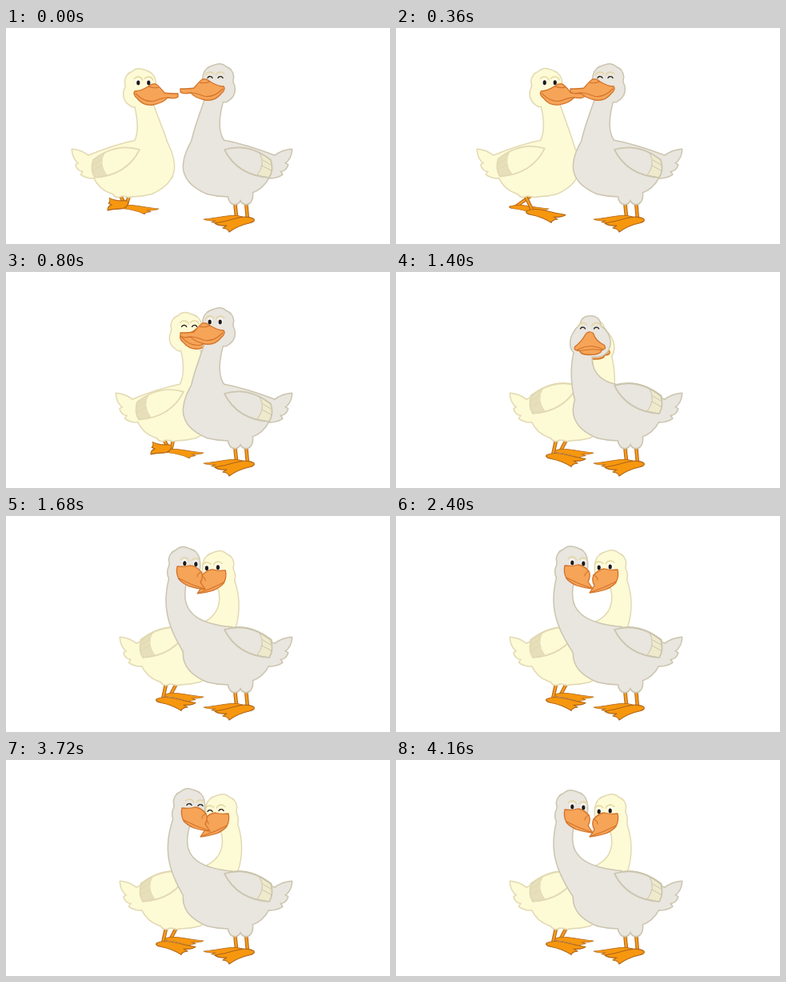
An HTML page with a canvas for the animation above (4.2 s loop, 480 by 270 pixels).

```html
<!DOCTYPE html>
<html lang="en">
<head>
<meta charset="utf-8">
<title>Two geese</title>
<style>
html, body { margin: 0; width: 100%; height: 100%; overflow: hidden; background: #fff; }
canvas { display: block; width: 480px; height: 270px; }
</style>
</head>
<body>
<canvas id="stage"></canvas>
<script>
const LOOP = 4200, STEP = 40;
const canvas = document.getElementById('stage');
const ctx = canvas.getContext('2d');
const dpr = window.devicePixelRatio || 1;
canvas.width = 480 * dpr;
canvas.height = 270 * dpr;

// Geese are described facing left. The neck is a cubic curve from head to chest;
// each of its points moves from a walking place to a turned-back place.
const GREY = {
  fill: '#e9e5df', line: '#cbc5ae', patch: '#eeeacb', girth: 1, rise: 0,
  neck: [[[267, 67], [218, 60]], [[258, 100], [196, 115]], [[240, 140], [215, 140]], [[262, 170], [262, 170]]],
  nuzzle: [9, -2]
};
const CREAM = {
  fill: '#fdfad6', line: '#e2d9b2', patch: '#e6dfba', girth: 0.94, rise: 9,
  neck: [[[274, 73], [230, 65]], [[268, 100], [205, 112]], [[250, 140], [222, 142]], [[265, 170], [262, 170]]],
  nuzzle: [-1, 0]
};

const BODY = new Path2D('M268 140Q300 146 336 160Q345 153 357 152Q356 164 348 169L352 171Q350 178 342 179L345 183Q337 188 328 187Q321 201 306 206Q280 214 252 207Q222 195 222 172Q223 155 236 136Z');
const WING = new Path2D('M273 152Q303 143 331 165Q335 177 329 187Q289 184 273 152Z');
const PATCH = new Path2D('M317 156Q325 170 314 184L329 187Q335 177 331 165Z');
const PATCH_LINES = new Path2D('M321 165L331 171M320 172L331 178');
const FOOT = new Path2D('M-41 5Q-28 3-15-1Q0-5 8 0Q10 3 2 5Q-12 8-23 16Q-24 12-31 11L-26 8Q-36 9-41 5Z');
const HEAD_SIDE = new Path2D('M-20-8Q-18-17-7-20Q2-24 8-18Q16-15 17-6Q15 0 18 5Q21 18 8 25L-12 24Q-24 10-20-8Z');
const HEAD_FRONT = new Path2D('M-12-10Q-10-20 0-20Q12-20 13-8Q24 0 25 12Q24 28 10 30L-10 30Q-25 26-24 12Q-24 2-12-10Z');
const FACES = {
  side: {
    eyes: [[-12, -5], [1, -5]],
    bill: 'M-49 9Q-38 9-32 8Q-24-2-21-3Q-16-4-12 0Q-2 6 5 6Q8 10 2 15Q-6 25-18 23Q-32 20-36 14Q-46 16-49 13Z',
    mouth: 'M4 9Q-8 21-20 18Q-30 14-36 14M-25 1Q-20 3-12 0'
  },
  front: {
    eyes: [[-9, -5], [8, -5]],
    bill: 'M-19 18Q-10 11-6 3Q-2-3 4 1Q7 11 18 16Q21 21 15 22Q13 28 0 28Q-12 28-13 23Q-21 23-19 18Z',
    mouth: 'M-16 22Q0 13 16 21M-12 23Q0 20 14 22'
  },
  turned: {
    eyes: [[-2, -2], [-16, -1]],
    bill: 'M7 2Q-3 3-9 1Q-16 1-23 9Q-26 15-22 22L-28 31Q-17 30-8 27Q1 23 5 18Q9 10 7 2Z',
    mouth: 'M5 17Q-10 25-26 30M-23 9Q-18 11-18 15'
  }
};
for (const f of Object.values(FACES)) {
  f.bill = new Path2D(f.bill);
  f.mouth = new Path2D(f.mouth);
}

const mix = (a, b, k) => a + (b - a) * k;
const smooth = k => k * k * (3 - 2 * k);

// Value at time t from [time, value] pairs.
function track(t, keys, ease = k => k) {
  if (t <= keys[0][0]) return keys[0][1];
  for (let i = 1; i < keys.length; i++) {
    const [t0, a] = keys[i - 1], [t1, b] = keys[i];
    if (t < t1) return mix(a, b, ease((t - t0) / (t1 - t0)));
  }
  return keys[keys.length - 1][1];
}

function moved(path, x, y, sx = 1, sy = 1) {
  const p = new Path2D();
  p.addPath(path, new DOMMatrix([sx, 0, 0, sy, x, y]));
  return p;
}

// Tapered tube along a cubic curve, widening toward the chest.
function tube([a, b, c, d]) {
  const left = [], right = [];
  for (let i = 0; i <= 24; i++) {
    const t = i / 24, u = 1 - t, w = 10.5 + 26 * t ** 3;
    const at = n => u * u * u * a[n] + 3 * u * u * t * b[n] + 3 * u * t * t * c[n] + t * t * t * d[n];
    const slope = n => u * u * (b[n] - a[n]) + 2 * u * t * (c[n] - b[n]) + t * t * (d[n] - c[n]);
    const len = Math.hypot(slope(0), slope(1));
    const nx = slope(1) / len * w, ny = -slope(0) / len * w;
    left.push([at(0) - nx, at(1) - ny]);
    right.unshift([at(0) + nx, at(1) + ny]);
  }
  const p = new Path2D();
  for (const q of left.concat(right)) p.lineTo(...q);
  p.closePath();
  return p;
}

function paint(path, fill, line, width) {
  ctx.fillStyle = fill;
  ctx.fill(path);
  ctx.strokeStyle = line;
  ctx.lineWidth = width;
  ctx.stroke(path);
}

// Lifting folds the foot back under the body.
function leg(hip, { x, y, lift, depth }) {
  const ankle = y - 8 * lift;
  for (const [color, w] of [['#b0661a', 4.6], ['#f59a1c', 2.6]]) {
    ctx.strokeStyle = color;
    ctx.lineWidth = w;
    ctx.beginPath();
    ctx.moveTo(hip, 206);
    ctx.lineTo(x, ankle);
    ctx.stroke();
  }
  ctx.save();
  ctx.translate(x, ankle);
  ctx.rotate(-2.6 * lift);
  ctx.scale(1 - 0.45 * lift, mix(depth, 1.1, lift));
  paint(FOOT, '#f6970f', '#b0661a', 1.2);
  ctx.restore();
}

function eye(x, y, closed) {
  ctx.strokeStyle = '#e2d49a';
  ctx.lineWidth = 1.3;
  ctx.beginPath();
  ctx.arc(x, y - 1, 6, Math.PI * 1.1, Math.PI * 1.8);
  ctx.stroke();
  ctx.beginPath();
  if (closed) {
    ctx.strokeStyle = '#2b2620';
    ctx.lineWidth = 1.4;
    ctx.arc(x, y + 2, 3.4, Math.PI * 1.15, Math.PI * 1.85);
    ctx.stroke();
    return;
  }
  ctx.fillStyle = '#fff';
  ctx.ellipse(x, y, 3, 4.3, 0, 0, 7);
  ctx.fill();
  ctx.fillStyle = '#1d1a18';
  ctx.beginPath();
  ctx.ellipse(x - 0.3, y + 0.4, 2.1, 3, 0, 0, 7);
  ctx.fill();
}

function goose(g, { turn, nuzzle, closed, far, near }) {
  const k = turn / 2;
  const neck = g.neck.map(([a, b], i) => {
    const pull = nuzzle * Math.max(0, 1 - i * 0.4);
    return [0, 1].map(n => mix(a[n], b[n], k) + g.nuzzle[n] * pull);
  });
  neck[0][1] += 12 * Math.sin(Math.PI * k) ** 2;
  const [hx, hy] = neck[0];

  const mode = turn < 0.6 ? 'side' : turn < 1.4 ? 'front' : 'turned';
  const flip = mode === 'turned' ? -1 : 1;
  const wingY = -10 * Math.min(1, turn * 2);
  const thighs = [286, 300].map(x => {
    const p = new Path2D();
    p.ellipse(x, 209 - g.rise, 8, 11, 0, 0, 7);
    return p;
  });
  const parts = [
    ...thighs,
    moved(BODY, 357 * (1 - g.girth), 0, g.girth),
    moved(WING, 0, wingY),
    tube(neck),
    moved(mode === 'front' ? HEAD_FRONT : HEAD_SIDE, hx, hy, flip)
  ];

  leg(285, far);
  leg(299, near);

  // Outline everything first so the fills merge into one silhouette.
  ctx.strokeStyle = g.line;
  ctx.lineWidth = 3;
  parts.forEach(p => ctx.stroke(p));
  ctx.fillStyle = g.fill;
  parts.forEach(p => ctx.fill(p));

  ctx.save();
  ctx.translate(0, wingY);
  paint(PATCH, g.patch, g.line, 1);
  ctx.stroke(PATCH_LINES);
  paint(WING, 'transparent', g.line, 1.7);
  ctx.restore();

  ctx.save();
  ctx.translate(hx, hy);
  ctx.scale(flip, 1);
  if (mode === 'front') ctx.translate((1 - turn) * 12, 0);
  const { eyes, bill, mouth } = FACES[mode];
  for (const [x, y] of eyes) eye(x, y, closed);
  paint(bill, '#f6a458', '#d1732a', 1.3);
  ctx.lineWidth = 1.1;
  ctx.stroke(mouth);
  ctx.restore();
}

function draw(t) {
  ctx.setTransform(dpr, 0, 0, dpr, 0, 0);
  ctx.fillStyle = '#fff';
  ctx.fillRect(0, 0, 480, 270);
  ctx.lineJoin = ctx.lineCap = 'round';

  const sway = 1 + 0.18 * Math.sin((t - 3240) / 240 * Math.PI);
  const nuzzle = sway * track(t, [[2880, 0], [3120, 1], [3720, 1], [4000, 0]], smooth);
  const cuddling = t >= 3000 && t < 3880;

  // The cream goose walks in from the left, mirrored.
  const dx = track(t, [[40, -60], [600, -27], [800, -5], [1000, 0]]);
  const local = x => 500 + dx - x;
  ctx.save();
  ctx.translate(500 + dx, 0);
  ctx.scale(-1, 1);
  goose(CREAM, {
    turn: track(t, [[0, 0], [600, 0.12], [800, 0.12], [1200, 0.7], [1400, 1], [1720, 2]]),
    nuzzle,
    closed: (t >= 720 && t < 1600) || cuddling,
    far: {
      x: local(track(t, [[400, 150], [600, 199], [760, 206]])), y: 223, depth: 0.6,
      lift: track(t, [[400, 0], [540, 1], [620, 1], [760, 0]])
    },
    near: {
      x: local(track(t, [[40, 149], [350, 171], [680, 171], [800, 203], [1000, 196]])), y: 229, depth: 0.9,
      lift: track(t, [[80, 1], [350, 0], [680, 0], [800, 1], [860, 1], [1000, 0]])
    }
  });
  ctx.restore();

  goose(GREY, {
    turn: track(t, [[1180, 0], [1400, 1], [1720, 2]]),
    nuzzle,
    closed: t < 680 || (t >= 1240 && t < 1560) || cuddling,
    far: { x: 288, y: 236, lift: 0, depth: 0.6 },
    near: { x: 302, y: 239, lift: 0, depth: 1 }
  });
}

const start = performance.now();
function tick() {
  const t = (performance.now() - start) % LOOP;
  draw(Math.floor(t / STEP) * STEP);
  requestAnimationFrame(tick);
}
tick();
</script>
</body>
</html>
```
